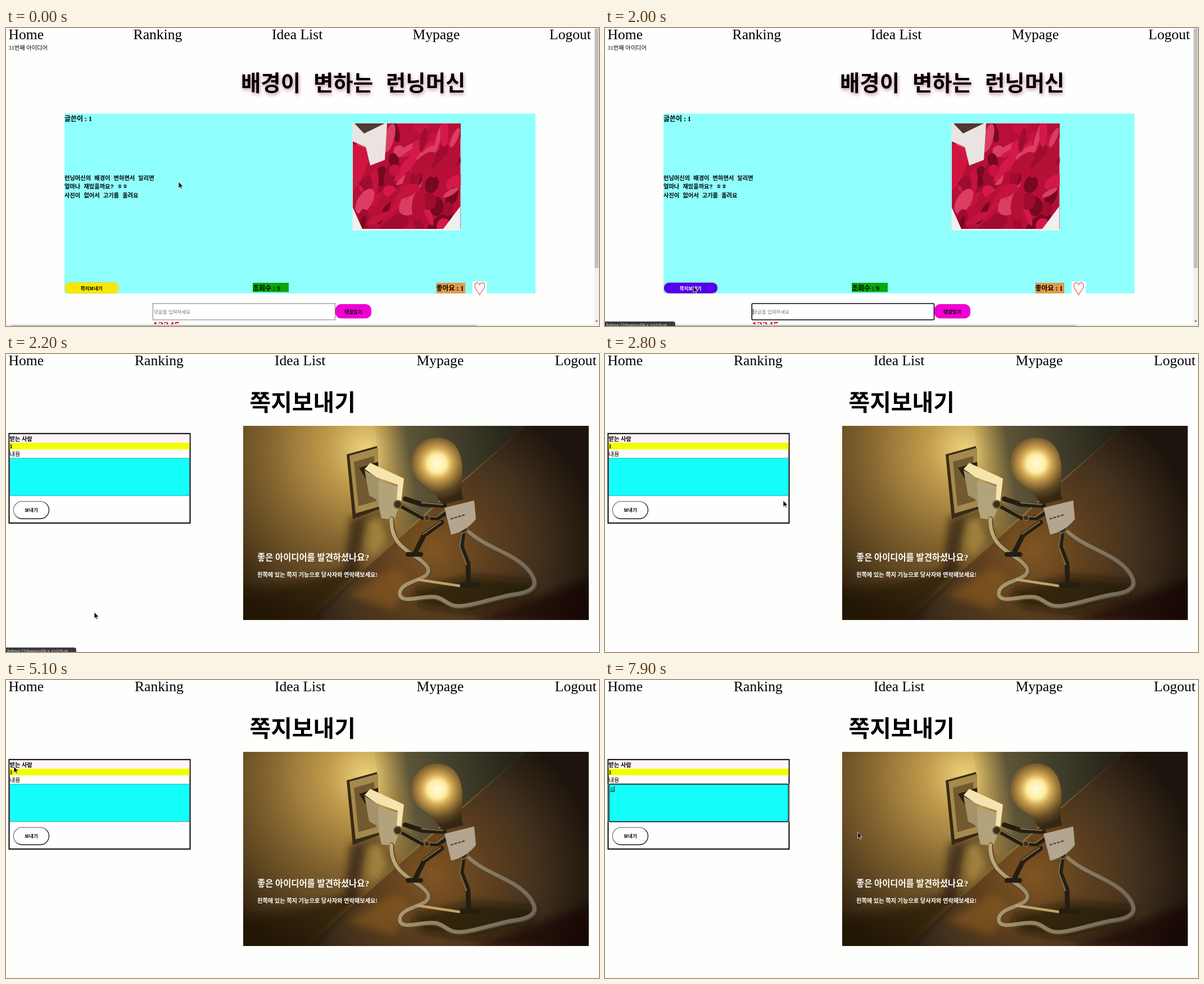
These frames come from a looping animation (1055x531 px, 8000 ms). An HTML page:

```html
<!DOCTYPE html>
<html lang="ko">
<head>
<meta charset="utf-8">
<style>
html, body { margin: 0; width: 100%; height: 100%; overflow: hidden; background: #fefefd; }
svg { display: block; width: 1055px; height: 531px; }
text { font-family: "Liberation Serif", "Noto Sans CJK KR", "Noto Sans CJK", serif; font-size: 10.24px; white-space: pre; }
.nav text { font-size: 25.6px; }
.mono { font-family: "Liberation Mono", "Noto Sans CJK KR", "Noto Sans CJK", monospace; }
.sans { font-family: "Noto Sans CJK KR", "Noto Sans CJK", sans-serif; font-size: 8.53px; }
.bold { font-weight: bold; }
.mid { text-anchor: middle; }
.h1 { font-size: 40.96px; font-weight: bold; }
.h3 { font-size: 11.98px; font-weight: bold; }
.title { font-size: 38.4px; filter: drop-shadow(1px 3px 3px #c58ba8); }
.limb { fill: none; stroke-linejoin: round; stroke-linecap: round; }
</style>
</head>
<body>
<svg viewBox="0 0 1055 531">
  <defs>
    <radialGradient id="wall" gradientUnits="userSpaceOnUse" cx="640" cy="170" r="340">
      <stop offset="0" stop-color="#ecd27c"/><stop offset=".2" stop-color="#c09b4c"/>
      <stop offset=".5" stop-color="#866630"/><stop offset=".75" stop-color="#5a4320"/><stop offset="1" stop-color="#291c0c"/>
    </radialGradient>
    <linearGradient id="farWall" gradientUnits="userSpaceOnUse" x1="655" y1="170" x2="900" y2="130">
      <stop offset="0" stop-color="#8d7d49" stop-opacity="0"/><stop offset=".25" stop-color="#5d5538"/>
      <stop offset=".6" stop-color="#403d2b"/><stop offset="1" stop-color="#262418"/>
    </linearGradient>
    <radialGradient id="floor" gradientUnits="userSpaceOnUse" cx="760" cy="350" r="290">
      <stop offset="0" stop-color="#805522"/><stop offset=".3" stop-color="#62421f"/>
      <stop offset=".65" stop-color="#42301d"/><stop offset="1" stop-color="#1d150d"/>
    </radialGradient>
    <radialGradient id="glow" gradientUnits="userSpaceOnUse" cx="767" cy="195" r="66">
      <stop offset="0" stop-color="#fffbe0"/><stop offset=".25" stop-color="#ffeda0"/>
      <stop offset=".42" stop-color="#d0a550"/><stop offset=".62" stop-color="#8d6d36"/>
      <stop offset=".78" stop-color="#5d4520"/><stop offset="1" stop-color="#352713"/>
    </radialGradient>
    <linearGradient id="cable" gradientUnits="userSpaceOnUse" x1="690" y1="300" x2="930" y2="400">
      <stop offset="0" stop-color="#c0ab78"/><stop offset=".4" stop-color="#9a8560"/><stop offset="1" stop-color="#75685a"/>
    </linearGradient>
    <linearGradient id="bevel" x1="0" y1="0" x2="1" y2="1">
      <stop offset=".4" stop-color="#777"/><stop offset=".6" stop-color="#111"/>
    </linearGradient>
    <filter id="soft" x="-30%" y="-30%" width="160%" height="160%"><feGaussianBlur stdDeviation="7"/></filter>
    <filter id="slight"><feGaussianBlur stdDeviation=".7"/></filter>
    <clipPath id="meatClip"><path d="M617 170H808.500V358H617Z"/></clipPath>
    <clipPath id="sceneClip"><path d="M422 128H1036.500V474H422Z"/></clipPath>
  </defs>

  <g class="nav" id="nav"></g>

  <g id="ideaPage">
    <text x="4.600" y="39">31번째 아이디어</text>
    <text class="mono bold title" x="418" y="112">배경이 변하는 런닝머신</text>
    <path fill="#8ffffd" d="M104 152.500H942V473H104Z"/>
    <text class="h3" x="104" y="165.500">글쓴이 : 1</text>
    <g class="bold">
      <text class="mono" x="104" y="271">런닝머신의 배경이 변하면서 달리면</text>
      <text class="mono" x="104" y="286.400">얼마나 재밌을까요? ㅎㅎ</text>
      <text class="mono" x="104" y="301.800">사진이 없어서 고기를 올려요</text>
    </g>
    <path fill="#eef3f1" d="M616.500 169.500H809V361H616.500Z"/>
    <g clip-path="url(#meatClip)">
      <path fill="#b80f3a" d="M617 170H809V361H617Z"/>
      <g id="meat" filter="url(#slight)"></g>
      <path fill="#e9e4e2" d="M617 170H678L674 235 648 245 640 212 617 202Z"/>
      <path fill="#51372f" d="M620 170H674L637 188Z"/>
      <path fill="#d01640" d="M617 206L640 214 646 238 630 275 617 290Z"/>
      <path fill="#f0eeee" d="M617 320L634 358H617ZM808 318V358H778Z"/>
    </g>
    <rect id="msgButton" x="104.500" y="453.500" width="96" height="19.500" rx="9.700" stroke="#c9cf50" stroke-width=".6"/>
    <text id="msgLabel" class="sans bold mid" x="152.300" y="467">쪽지보내기</text>
    <path fill="#0aa60a" d="M439 454H503V470.500H439Z"/>
    <text class="h3" x="439" y="467.500">조회수 : 9</text>
    <path fill="#e09a4a" d="M765.500 454H817V473H765.500Z"/>
    <text class="h3" x="765.500" y="467.500">좋아요 : 1</text>
    <path fill="#fefefe" d="M830 451.500H855.500V475H830Z"/>
    <path fill="none" stroke="#dc6d6d" stroke-width="1.300" d="M842.700 457.500C840 452 834 453 834 459.500C834 466 841 470 842.700 475.500C844.500 470 851.500 466 851.500 459.500C851.500 453 845.500 452 842.700 457.500Z"/>
    <rect id="comment" x="261.300" y="491" width="324.200" height="29" fill="#fff"/>
    <text class="sans" x="263" y="509" fill="#757575">댓글을 입력하세요</text>
    <path id="commentCaret" stroke="#000" stroke-width=".8" d="M263.500 500.500V511"/>
    <rect x="586" y="492" width="64" height="25.500" rx="10" fill="#ef00d3"/>
    <text class="sans bold mid" x="618" y="508.500">댓글달기</text>
    <text class="bold" x="261" y="537" fill="#d80d1c" style="font-size:19.2px">12345</text>
    <path fill="#f1f1f1" d="M0 528H1047V531H0Z"/>
    <path fill="#bdbdbd" d="M9 529.300H838V531H9Z"/>
  </g>

  <g id="scrollbar">
    <path fill="#f1f1f1" d="M1046.500 0H1055V531H1046.500Z"/>
    <rect id="thumb" x="1047.300" y="1" width="7" fill="#c0c0c0"/>
    <path id="arrow" fill="#505050" d="M1048.500 521.500H1053.500L1051 524Z"/>
  </g>

  <g id="chatPage">
    <text id="chatTitle" class="h1" y="100.800">쪽지보내기</text>
    <path fill="#fefefe" stroke="#000" stroke-width="2" d="M5.500 141.700H327.500V301.300H5.500Z"/>
    <path fill="#fff5fa" d="M6.500 143H326.500V158H6.500Z"/>
    <path fill="#f2ff00" d="M6.500 158H326.500V170H6.500Z"/>
    <text class="bold" x="6.500" y="155">받는 사람</text>
    <text class="bold" x="6.500" y="167.500">1</text>
    <text x="6.500" y="182">내용</text>
    <rect id="focusRing" x="6" y="184.600" width="321.400" height="68.800" rx="2" fill="none" stroke="#fff"/>
    <rect id="message" x="7" y="185.500" width="319.400" height="67" fill="#14fffb"/>
    <path stroke="#4b8c8c" stroke-width=".6" d="M321 251.500L325.500 247M323.500 251.500L325.500 249.500"/>
    <text id="typed" class="sans" x="8.800" y="197.500" text-decoration="underline"></text>
    <path id="caret" stroke="#000" stroke-width=".8"/>
    <rect x="13.300" y="262.700" width="63.200" height="30.800" rx="15.400" fill="#fefefe" stroke="url(#bevel)" stroke-width="1.300"/>
    <text class="sans bold mid" x="45" y="281.300">보내기</text>
  </g>

  <g id="scene" clip-path="url(#sceneClip)">
    <path fill="url(#wall)" d="M422 128H1037V474H422Z"/>
    <path fill="url(#farWall)" d="M655 128H925L706 318 672 250Z"/>
    <path fill="url(#floor)" d="M537 474L925 128H1037V474Z"/>
    <g filter="url(#soft)">
      <path fill="#1d1409" opacity=".6" d="M400 430L520 405 640 375 540 480H400Z"/>
      <path fill="#2b1d0b" opacity=".7" d="M612 292L668 276 690 330 655 350 640 310 622 390 600 400Z"/>
      <path fill="#d9b256" opacity=".6" d="M644 300L664 290 680 330 650 360Z"/>
      <path fill="#8a5c22" opacity=".6" d="M610 430L690 380 720 400 690 455Z"/>
      <path fill="#140d07" opacity=".6" d="M720 420L830 395 945 405 930 435 830 462 740 450Z"/>
      <path fill="#100b06" opacity=".6" d="M830 474L1040 400V480Z"/>
    </g>
    <path fill="#382a15" d="M606 179L660 164 668 275 617 294Z"/>
    <path fill="#a58a4c" d="M611 181L662 167 663 272 622 284Z"/>
    <path fill="#715a30" d="M619 192L655 182 659 262 627 271Z"/>
    <path fill="#2b1f10" d="M628 203L662 192V200L640 222Z"/>
    <path fill="#a4926a" d="M638 207L664 222V262L646 252Z"/>
    <path fill="#b3a37a" d="M662 225L697 236 703 262 691 295 668 293 663 270Z"/>
    <path fill="#f6e4ae" d="M638 205L648 194 708 222 703 264 695 262 697 233 660 220Z"/>
    <g class="limb">
      <g id="cord">
        <path stroke="#51442f" stroke-width="9" d="M686 294C684 352 736 356 751 382C761 406 699 402 701 430C706 447 742 430 765 434C785 438 786 454 818 449C850 444 880 432 912 428C942 422 949 410 930 386C905 356 858 348 824 318"/>
        <path stroke="url(#cable)" stroke-width="6.500" d="M685.500 294C683.500 351 735.500 355 750.500 381C760.500 405 698.500 401 700.500 429C705.500 446 741.500 429 764.500 433C784.500 437 785.500 453 817.500 448C849.500 443 879.500 431 911.500 427C941.500 421 948.500 409 929.500 385C904.500 355 857.500 347 823.500 317"/>
      </g>
      <path stroke="#bba56d" stroke-width="4.500" d="M733 402L806 413"/>
      <path stroke="#241d13" stroke-width="8.500" d="M790 278L768 292 741 291 699 268M780 270L740 268 710 258M775 300L744 322 729 352M814 310L810 343 822 374 823 408M715 357L738 357M812 412L840 412"/>
      <path stroke="#80693f" stroke-width="2.500" d="M787 275L766 290 741 288 699 265M777 268L740 265M773 299L742 321M812 310L807 343 819 375"/>
    </g>
    <g fill="#3a2f1d" stroke="#7a663f" stroke-width="2">
      <circle cx="697" cy="268" r="7"/><circle cx="813" cy="311" r="8"/><circle cx="749" cy="292" r="5"/>
    </g>
    <path fill="url(#glow)" d="M767 149C735 149 720 174 721 198C722 224 747 232 760 246C767 254 770 261 778 268L814 259C808 246 812 232 812 214C814 178 800 149 767 149Z"/>
    <path fill="#b3a58f" d="M780 274L833 261 836 294Q820 315 792 322Z"/>
    <path stroke="#51483b" stroke-width="2.500" stroke-dasharray="5 2" d="M791 294L818 286"/>
    <text x="447" y="368" fill="#fff" class="bold" style="font-size:15.36px">좋은 아이디어를 발견하셨나요?</text>
    <text x="447" y="397" fill="#fff" class="bold">왼쪽에 있는 쪽지 기능으로 당사자와 연락해보세요!</text>
  </g>

  <g id="status">
    <path fill="#393b3d" d="M0 523H121Q125 523 125 527V531H0Z"/>
    <text x="2.500" y="533" fill="#d5d7d9" style="font:9.2px 'Noto Sans',sans-serif">https://dremolika.zz/chat</text>
  </g>
  <path id="cursor" fill="#111" stroke="#eee" stroke-width=".8" d="M0 0V11.500L2.700 9 4.600 13 6.300 12.200 4.500 8.300H8Z"/>
</svg>

<script>
const $ = id => document.getElementById(id);
const show = (id, on) => $(id).style.display = on ? "" : "none";
const set = (id, attrs) => { for (const k in attrs) $(id).setAttribute(k, attrs[k]); };
const within = (t, a, b) => t >= a && t < b;

const LOOP = 8000, STEP = 100;
const NAV = ["Home", "Ranking", "Idea List", "Mypage", "Logout"];
const NAV_X = { narrow: [4.6, 226.6, 473, 723.4, 966.8], wide: [4.6, 229, 478, 730.4, 976.6] };

// Pointer path: time, x, y
const PATH = [
  [0, 307, 274], [100, 306, 274], [200, 306, 274], [900, 168, 459], [1100, 168, 459],
  [1300, 473, 450], [1500, 437, 460], [1700, 437, 460], [1800, 157, 460], [2200, 157, 460],
  [2800, 317, 261], [3400, 74, 161], [3700, 73.5, 161], [4100, 20, 161], [4200, 20, 161],
  [4300, 2, 158], [4500, 2, 158], [4600, 40, 144], [4700, 2, 149], [5000, 2, 149],
  [5100, 14, 154], [5200, 14, 154], [5300, 200, 240], [5400, 200, 240], [6200, 426, 243],
  [7000, 426, 243], [7100, 426.5, 243], [7600, 426.5, 243], [7900, 449.5, 271], [LOOP, 449.5, 271]
];

function pointerAt(t) {
  const i = PATH.findIndex(p => p[0] > t);
  const [t0, x0, y0] = PATH[i - 1], [t1, x1, y1] = PATH[i];
  const k = (t - t0) / (t1 - t0);
  return [x0 + (x1 - x0) * k, y0 + (y1 - y0) * k];
}

function buildMeat() {
  let seed = 11;
  const rnd = () => (seed = seed * 16807 % 2147483647) / 2147483647;
  const tones = ["#d3194a", "#a00c30", "#c5123f", "#76081f", "#dc3d62", "#b41035"];
  let out = "";
  for (let i = 0; i < 90; i++) {
    const x = 617 + rnd() * 192, y = 172 + rnd() * 186;
    out += `<ellipse cx="${x}" cy="${y}" rx="${4 + rnd() * 10}" ry="${10 + rnd() * 18}"
      fill="${tones[i % 6]}" transform="rotate(${rnd() * 90 - 20} ${x} ${y})"/>`;
  }
  $("meat").innerHTML = out;
}

function render(now) {
  const t = Math.floor(now % LOOP / STEP) * STEP;
  const chat = t >= 2100, loaded = t >= 2200;
  show("ideaPage", !chat);
  show("chatPage", chat);
  show("scene", loaded);
  show("scrollbar", !loaded);
  show("arrow", !chat);
  set("thumb", { height: chat ? 457 : 427 });
  [...$("nav").children].forEach((e, i) => e.setAttribute("x", NAV_X[loaded ? "wide" : "narrow"][i]));
  set("chatTitle", { x: loaded ? 433.5 : 428.5 });

  const hover = within(t, 1100, 1200) || t >= 1800;
  set("msgButton", { fill: hover ? "#5200f2" : "#f9e800" });
  set("msgLabel", { fill: hover ? "#fff" : "#000" });
  const commenting = t >= 2000;
  set("comment", { stroke: commenting ? "#000" : "#777", "stroke-width": commenting ? 1.6 : 1, rx: commenting ? 1.5 : 0 });
  show("commentCaret", commenting);
  show("status", within(t, 1100, 1400) || within(t, 2000, 2700));

  const writing = t >= 5300;
  show("focusRing", writing);
  set("message", { stroke: writing ? "#000" : "#4a9b9b", "stroke-width": writing ? 1.3 : 0.8, rx: writing ? 2 : 0 });
  $("typed").textContent = t >= 7800 ? "으" : t >= 7700 ? "ㅇ" : "";
  const caretX = t >= 7700 ? 16.7 : 9;
  set("caret", { d: `M${caretX} 188.500V199` });
  show("caret", within(t, 5300, 5700) || within(t, 6500, 7300) || t >= 7700);

  set("cursor", { transform: `translate(${pointerAt(t)})` });
  requestAnimationFrame(() => render(performance.now() - start));
}

$("nav").innerHTML = NAV.map(s => `<text y="20.200">${s}</text>`).join("");
buildMeat();
const start = performance.now();
render(0);
</script>
</body>
</html>
```
